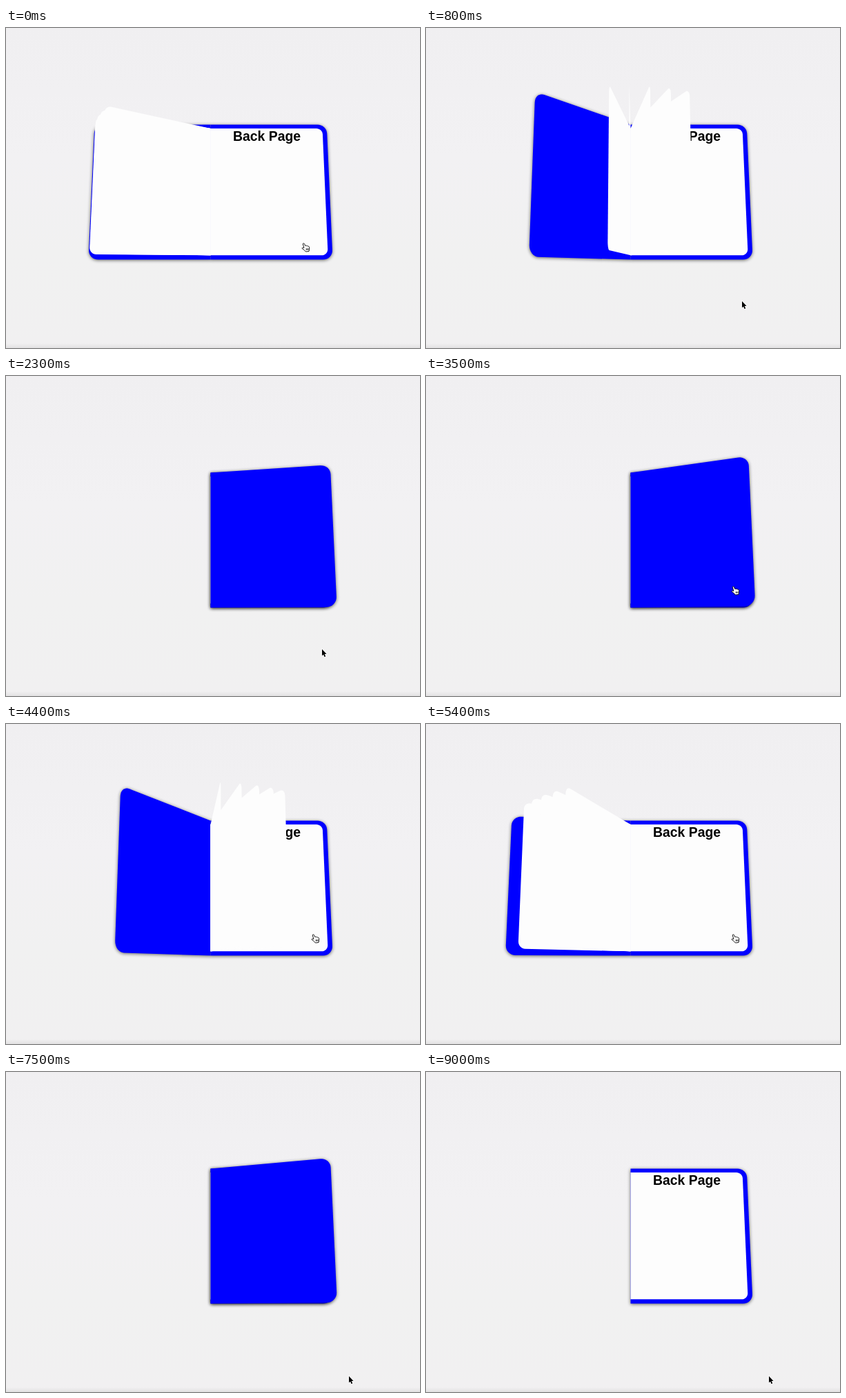
An HTML page for the animation above (9.4 s loop, 600 px wide and 465 px high).

```html
<!DOCTYPE html>
<html lang="en">
<head>
<meta charset="utf-8">
<title>Opening book</title>
<style>
  html, body { margin: 0; width: 100%; height: 100%; overflow: hidden; background: #f1f0f2; }
  svg { display: block; width: 100%; height: 100%; }
  text { font: bold 19.4px "Liberation Sans", Arial, sans-serif; text-anchor: middle; }
</style>
</head>
<body>
<svg viewBox="0 0 600 465">
  <defs>
    <linearGradient id="wall" x1="0" y1="0" x2="0" y2="1">
      <stop offset="0" stop-color="#f0eff1"/>
      <stop offset=".4" stop-color="#f2f1f3"/>
      <stop offset=".7" stop-color="#f1f1f1"/>
      <stop offset=".985" stop-color="#f1f0f1"/>
      <stop offset="1" stop-color="#e3e2e3"/>
    </linearGradient>
    <filter id="soft" filterUnits="userSpaceOnUse" x="0" y="0" width="600" height="465">
      <feGaussianBlur stdDeviation="2.8"/>
    </filter>
  </defs>
  <rect width="600" height="465" fill="url(#wall)"/>
  <g id="low"></g>
  <g id="base"></g>
  <text x="378" y="164.3">Back Page</text>
  <g id="leaves"></g>
  <path id="hand" fill="#fff" stroke="#000" stroke-width=".9" stroke-linejoin="round"
    d="M-.8 .6C.1-.6 1.2-.2 1.6 .9L2.8 3.6C3.6 2.9 4.6 3.1 5 3.9 5.8 3.3 6.7 3.6 7 4.4 7.8 4.1 8.5 4.6 8.6 5.6V8.6L8 11.5 3.4 12 1.2 9.6-1.8 7.4C-2.2 6.3-1.1 5.7 .2 6.4L.9 6.6ZM4.2 7.4V9.6M5.7 7.4V9.6M7.1 7.4V9.6"/>
  <path id="arrow" fill="#000" stroke="#fff" stroke-width="1.2" paint-order="stroke"
    d="M0 0V9.5L2 7.7 3.6 11.3 5.2 10.6 3.7 7.1H6.6Z"/>
</svg>
<script>
const LOOP = 9400, VANISH = 9000;
const SPINE = 296.5, MID = 236, DEPTH = 670, TILT = 10 * Math.PI / 180;
const COVER = { w: 172.5, h: 99.5, r: 13.5 };
const PAGE = { w: 166, h: 93.5, r: 9 };
const OPENS = [-3000, 3130], CLOSES = [240, 5616];

const $ = id => document.getElementById(id);
const low = $('low'), base = $('base'), leaves = $('leaves');

function addPath(parent, fill) {
  const p = document.createElementNS('http://www.w3.org/2000/svg', 'path');
  p.setAttribute('fill', fill);
  parent.append(p);
  return p;
}

function addShadow(parent) {
  const p = addPath(parent, '#000');
  p.setAttribute('opacity', '.6');
  p.setAttribute('filter', 'url(#soft)');
  p.setAttribute('transform', 'translate(0 1)');
  return p;
}

// Point on the tilted book: x across, y along the spine, z out of the cover.
function project(x, y, z) {
  const sin = Math.sin(TILT), cos = Math.cos(TILT);
  const s = DEPTH / (DEPTH - y * sin - z * cos);
  return (SPINE + x * s).toFixed(2) + ' ' + (MID + (y * cos - z * sin) * s).toFixed(2);
}

function outline({ w, h, r }, deg) {
  const a = deg * Math.PI / 180, steps = 8;
  const at = (u, v) => project(u * Math.cos(a), v, u * Math.sin(a));
  const pts = [at(0, -h)];
  for (const side of [-1, 1]) {
    for (let i = 0; i <= steps; i++) {
      const k = (side < 0 ? steps - i : i) / steps * Math.PI / 2;
      pts.push(at(w - r + r * Math.cos(k), side * (h - r + r * Math.sin(k))));
    }
  }
  pts.push(at(0, h));
  return 'M' + pts.join('L') + 'Z';
}

// cubic-bezier(.25, .1, .25, 1)
function ease(x) {
  if (x <= 0) return 0;
  if (x >= 1) return 1;
  const curve = (k, a, b) => 3 * k * (1 - k) ** 2 * a + 3 * k * k * (1 - k) * b + k ** 3;
  let lo = 0, hi = 1;
  for (let i = 0; i < 24; i++) {
    const m = (lo + hi) / 2;
    if (curve(m, .25, .25) < x) lo = m; else hi = m;
  }
  return curve(lo, .1, 1);
}

// An interrupted opening closes in a proportionally shorter time.
function angle(t, openTime, closeTime) {
  const i = t < OPENS[1] ? 0 : 1;
  const done = ease((Math.min(t, CLOSES[i]) - OPENS[i]) / openTime);
  if (t < CLOSES[i]) return 180 * done;
  return 180 * done * (1 - ease((t - CLOSES[i]) / (closeTime * done)));
}

const backShadow = addShadow(low), underShadow = addShadow(low);
addPath(base, '#00f').setAttribute('d', outline(COVER, 0));
addPath(base, '#fdfdfd').setAttribute('d', outline(PAGE, 0));
backShadow.setAttribute('d', outline(COVER, 0));

const overShadow = addShadow(leaves);
const cover = { size: COVER, open: 3000, close: 3000, path: addPath(leaves, '#00f') };
const pages = Array.from({ length: 5 }, (_, i) => ({
  size: PAGE, open: 4500 + 375 * i, close: 2300 - 65 * i, path: addPath(leaves, '#fdfdfd')
}));
const all = [cover, ...pages];

function drawBook(t) {
  const shown = t < VANISH;
  leaves.style.display = underShadow.style.display = shown ? '' : 'none';
  if (!shown) return;
  for (const leaf of all) {
    leaf.deg = angle(t, leaf.open, leaf.close);
    leaf.path.setAttribute('d', outline(leaf.size, leaf.deg));
  }
  const shape = cover.path.getAttribute('d'), left = cover.deg > 90;
  underShadow.setAttribute('d', left ? shape : '');
  overShadow.setAttribute('d', left ? '' : shape);

  // Leaves nearest to upright are in front; the cover wins when all lie flat on the right.
  const rank = leaf => Math.abs(leaf.deg - 90) - (leaf === cover && !left ? .01 : 0);
  for (const leaf of [...all].sort((a, b) => rank(b) - rank(a))) {
    if (leaf === cover) leaves.append(overShadow);
    leaves.append(leaf.path);
  }
}

const MOVES = [
  { from: 60, to: 560, x: 458, y: 397 },
  { from: 2950, to: 3400, x: 445, y: 306 },
  { from: 5420, to: 5950, x: 497, y: 442 }
];

function drawCursor(t) {
  let x = 431, y = 313;
  for (const m of MOVES) {
    const k = Math.min(1, Math.max(0, (t - m.from) / (m.to - m.from)));
    const e = k * k * (3 - 2 * k);
    x += (m.x - x) * e;
    y += (m.y - y) * e;
  }
  const over = y < 337;
  $('hand').style.display = over ? '' : 'none';
  $('arrow').style.display = over ? 'none' : '';
  $(over ? 'hand' : 'arrow').setAttribute('transform', `translate(${x.toFixed(2)} ${y.toFixed(2)})`);
}

function draw(t) {
  drawBook(t);
  drawCursor(t);
}

const start = performance.now();
function frame() {
  draw((performance.now() - start) % LOOP);
  requestAnimationFrame(frame);
}
draw(0);
requestAnimationFrame(frame);
</script>
</body>
</html>
```
